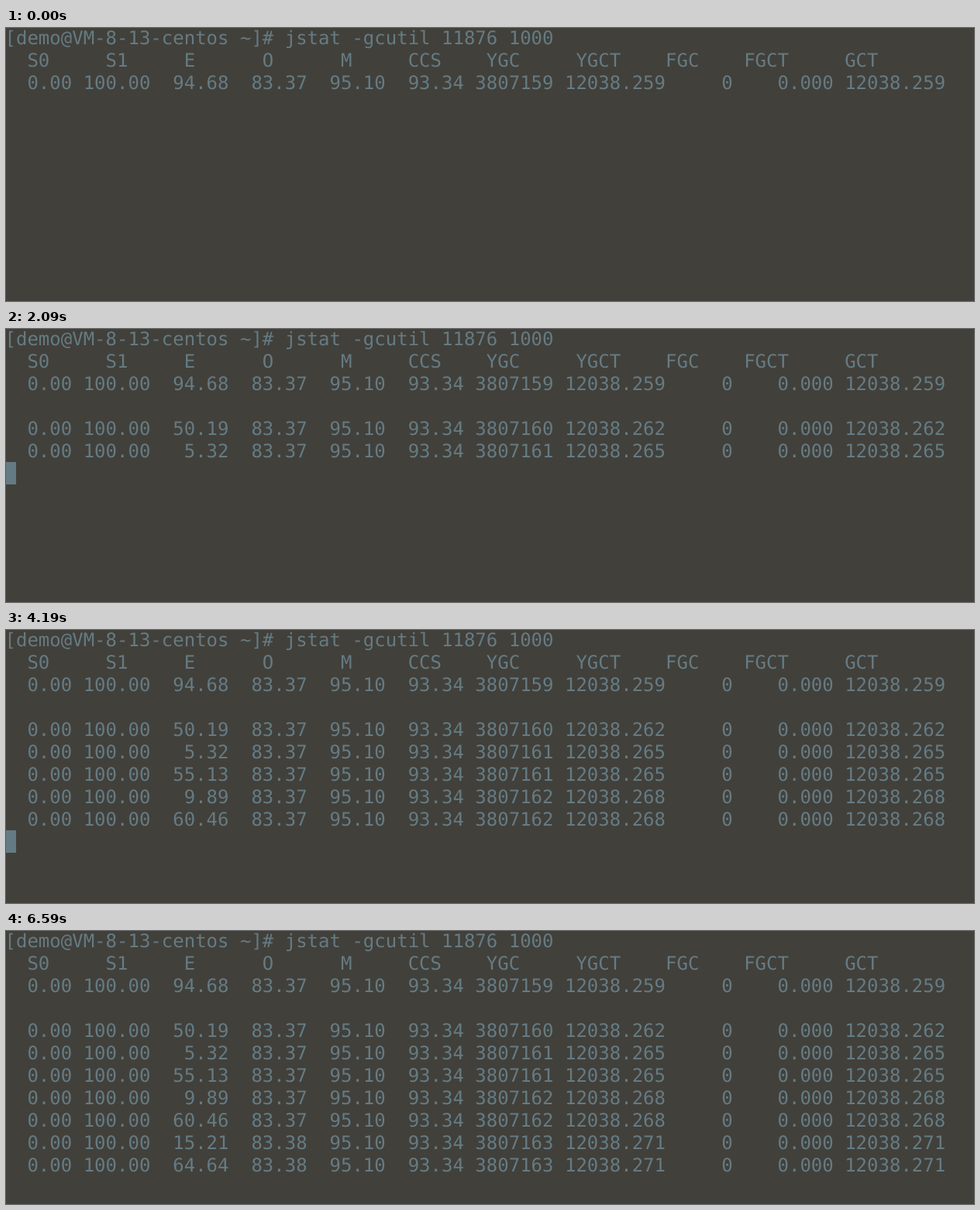
Animation, 1249 px wide and 353 px high, one loop 6.61 s. Source, as an HTML page with a canvas:

```html
<!DOCTYPE html>
<html lang="en">
<head>
<meta charset="utf-8">
<title>jstat</title>
<style>
html, body { margin: 0; width: 100%; height: 100%; overflow: hidden; background: #42403b; }
canvas { display: block; }
</style>
</head>
<body>
<canvas id="term" width="1249" height="353"></canvas>
<script>
const ctx = document.getElementById('term').getContext('2d');
const LOOP = 6610;
const BG = '#42403b', FG = '#657b83';
const CELL = 14.449, LINE = 29, LEFT = -1.5, TOP = -2, BASE = 23;
const FIRST_ROW = 4;

const HEAD = [
  '[demo@VM-8-13-centos ~]# jstat -gcutil 11876 1000',
  '  S0     S1     E      O      M     CCS    YGC     YGCT    FGC    FGCT     GCT'
];

// jstat row: eden use, old use, collections since the first sample
function stat(eden, old, gcs) {
  const time = (12038.259 + gcs * 0.003).toFixed(3);
  return `  0.00 100.00 ${eden.toFixed(2).padStart(6)}  ${old.toFixed(2)}  95.10  93.34 ` +
    `${3807159 + gcs} ${time}     0    0.000 ${time}`;
}

HEAD.push(stat(94.68, 83.37, 0));

const ROWS = [
  { at: 440, text: stat(50.19, 83.37, 1) },
  { at: 1790, text: stat(5.32, 83.37, 2) },
  { at: 2240, text: stat(55.13, 83.37, 2) },
  { at: 3290, text: stat(9.89, 83.37, 3) },
  { at: 4190, text: stat(60.46, 83.37, 3) },
  { at: 5240, text: stat(15.21, 83.38, 4) },
  { at: 6290, text: stat(64.64, 83.38, 4) }
];

// Cursor visibility spans [on, off)
const BLINKS = [
  [150, 740], [1190, 1640], [2090, 2540], [3140, 3590],
  [4040, 4640], [5090, 5540], [6140, 6590]
];

// Each character sits on the terminal grid
function drawLine(text, row) {
  const y = TOP + row * LINE + BASE;
  [...text].forEach((ch, col) => {
    if (ch !== ' ') ctx.fillText(ch, LEFT + col * CELL, y);
  });
}

function draw(t) {
  ctx.fillStyle = BG;
  ctx.fillRect(0, 0, 1249, 353);
  ctx.fillStyle = FG;
  ctx.font = '24px "DejaVu Sans Mono", monospace';
  ctx.textRendering = 'geometricPrecision';

  HEAD.forEach(drawLine);
  const shown = ROWS.filter(row => t >= row.at);
  shown.forEach((row, i) => drawLine(row.text, FIRST_ROW + i));

  if (BLINKS.some(([on, off]) => t >= on && t < off)) {
    ctx.fillRect(0, TOP + (FIRST_ROW + shown.length) * LINE, 13, LINE);
  }
}

const start = performance.now();
function tick() {
  draw((performance.now() - start) % LOOP);
  requestAnimationFrame(tick);
}
tick();
</script>
</body>
</html>
```
